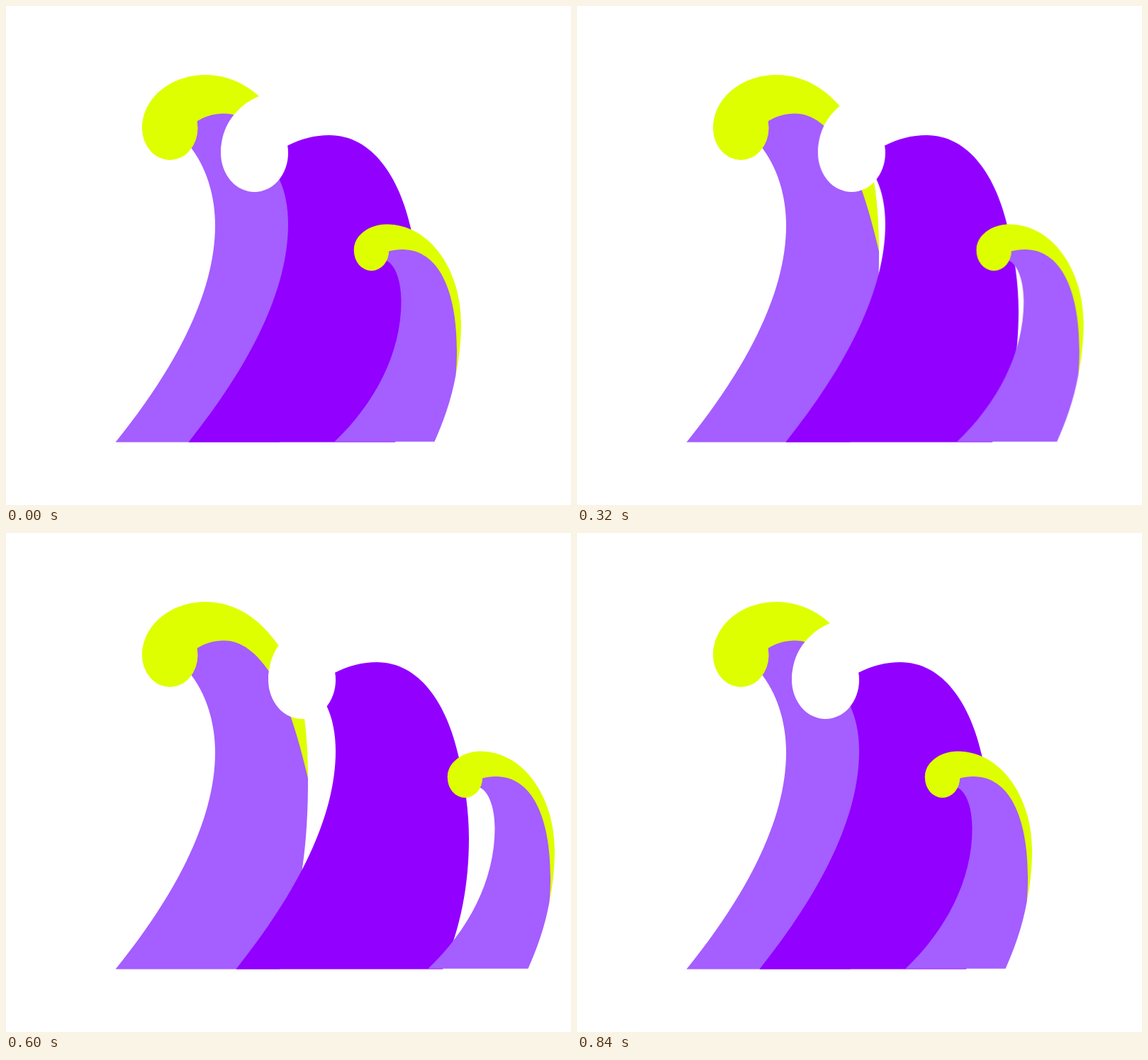
These frames come from a looping animation (797 px wide and 703 px high, 1 s). An HTML page:

```html
<!DOCTYPE html>
<html lang="en">
<head>
<meta charset="utf-8">
<title>Waves</title>
<style>
  html, body { margin: 0; width: 100%; height: 100%; overflow: hidden; background: #fff; }
  svg { display: block; width: 100%; height: 100%; }
  .lime { fill: #deff00; }
  .white { fill: #fff; }
  .light { fill: #a55eff; }
  .deep { fill: #9200ff; }

  /* Each wave drifts by whole steps; --step sets its speed. */
  .drift { animation: drift 1s step-end infinite; }
  .middle { --step: 3.35px; }
  .front { --step: 6.6px; }

  @keyframes drift {
    0% { transform: translateX(0); }
    4% { transform: translateX(var(--step)); }
    8% { transform: translateX(calc(var(--step) * 3)); }
    12% { transform: translateX(calc(var(--step) * 4)); }
    16% { transform: translateX(calc(var(--step) * 5)); }
    20% { transform: translateX(calc(var(--step) * 7)); }
    24% { transform: translateX(calc(var(--step) * 8)); }
    28% { transform: translateX(calc(var(--step) * 9)); }
    32% { transform: translateX(calc(var(--step) * 11)); }
    36% { transform: translateX(calc(var(--step) * 12)); }
    40% { transform: translateX(calc(var(--step) * 13)); }
    44% { transform: translateX(calc(var(--step) * 15)); }
    48% { transform: translateX(calc(var(--step) * 16)); }
    52% { transform: translateX(calc(var(--step) * 17)); }
    56% { transform: translateX(calc(var(--step) * 19)); }
    60% { transform: translateX(calc(var(--step) * 20)); }
    64% { transform: translateX(calc(var(--step) * 21)); }
    68% { transform: translateX(calc(var(--step) * 23)); }
    /* eased return */
    72% { transform: translateX(calc(var(--step) * 16)); }
    76% { transform: translateX(calc(var(--step) * 9.85)); }
    80% { transform: translateX(calc(var(--step) * 1.45)); }
    84%, 100% { transform: translateX(0); }
  }
</style>
</head>
<body>
<svg viewBox="0 0 797 703">
  <!-- Each wave: crest, body, curl -->
  <g>
    <path class="lime" d="M192 172C192 130 232 97 281 97C325 97 359 122 384.5 158.5
      C405 188 414 220 420 254C424 281 426 314 426 346L250 172Z"/>
    <path class="light" d="M250 180L270 162C281 155.5 294 151.5 307 151.5C333 151.5 354 170 371 195
      C384 214 394 237 402 260C411 286 419 316 426 346C426 390 424 432 418 472
      C411 520 401 570 386 614.5H154.5C242 506 295 402 295 309C295 268 283 229 262 201Z"/>
    <ellipse class="lime" cx="231.2" cy="172" rx="39.3" ry="45"/>
  </g>
  <g class="drift middle">
    <path class="white" d="M303 207C303 189 308 172 317.5 158.5C328 144 341 133.5 357 127
      C400 110 450 110 480 125V200H350Z"/>
    <path class="deep" d="M375 215L397.5 196.5C416 187 436 182 456 182C516 182 555 240 571.5 315
      C580 353 586 390 586 430C586 495 575 555 549 614.5H257.5
      C345 505 398 400 398 307C398 284 394 262 385.5 244Z"/>
    <ellipse class="white" cx="350.5" cy="207" rx="47.5" ry="55"/>
  </g>
  <g class="drift front">
    <path class="lime" d="M490.8 344.5C490.8 324 511 307.5 537 307.5C598 307.5 642 372 642 447
      C642 473 639 497 634.5 520L590 380L515 345Z"/>
    <path class="light" d="M525 350L540 345.5C546 344 552 343 559 343C610 343 636 400 636 485
      C636 497 635.5 508 634.5 520C628 556 616 588 604.5 613.8H463.5
      C520 560 557.5 490 557.5 416C557.5 389 550 365 537 359Z"/>
    <ellipse class="lime" cx="515.5" cy="344.5" rx="24.7" ry="28.5"/>
  </g>
</svg>
</body>
</html>
```
